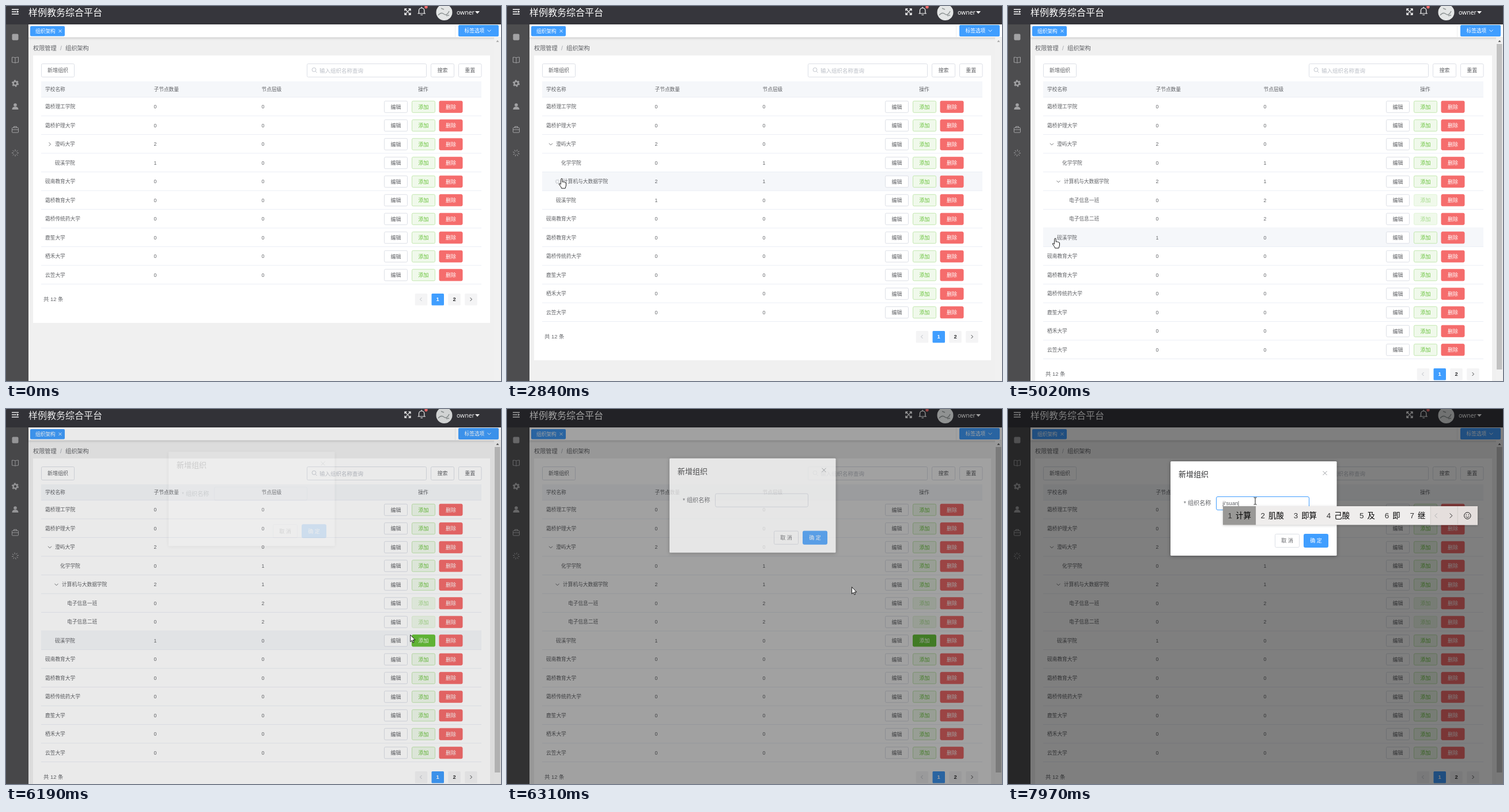
An HTML page that plays this animation: 859x652 px, repeating every 8000 ms.

```html
<!DOCTYPE html>
<html lang="zh-CN">
<head>
<meta charset="utf-8">
<title>组织架构</title>
<style>
  html, body { margin: 0; width: 100%; height: 100%; overflow: hidden; background: #f0f0f0; }
  svg { display: block; width: 100vw; height: 100vh; }
  text { font-family: "Liberation Sans", "Noto Sans CJK SC", "Noto Sans CJK", sans-serif; white-space: pre; }
  .dialog { filter: drop-shadow(0 1px 3px #0005); }
  .bar { filter: drop-shadow(0 1px 2px #0003); }
</style>
</head>
<body>
<svg id="stage" viewBox="0 0 859 652" xmlns="http://www.w3.org/2000/svg"></svg>
<script>
const LOOP = 8000, ROW_TOP = 159, ROW_H = 32.5;
const BLUE = '#409eff', GREEN = '#67c23a', RED = '#f56c6c', INK = '#606266', LINE = '#dcdfe6';
const DIALOG_AT = 6165, FOCUS_AT = 6830;

// Nodes: name, children, time of opening
const tree = [
  ['霜桥理工学院'],
  ['霜桥护理大学'],
  ['澄屿大学', [
    ['化学学院'],
    ['计算机与大数据学院', [['电子信息一班'], ['电子信息二班']], 3000]
  ], 1800],
  ['砚溪学院', [['化学学院']], Infinity],
  ['砚南教育大学'],
  ['霜桥教育大学'],
  ['霜桥传统药大学'],
  ['鹿笙大学'],
  ['栖禾大学'],
  ['云笠大学']
];
const LOAD_TIME = { 1800: 460, 3000: 250 };

// Pointer stops: time, x, y, easing towards the stop
const smooth = p => p * p * (3 - 2 * p), easeIn = p => p * p, easeOut = p => p * (2 - p);
const stops = [
  [70, 800, 645], [860, 110, 275, smooth], [1130, 80, 242, easeOut], [1900, 80, 242, smooth],
  [2500, 95, 300, smooth], [3500, 95, 300, smooth], [4150, 86, 418, smooth], [4500, 84, 425, smooth],
  [4950, 82, 404, smooth], [5150, 82, 404, smooth], [5750, 722, 404, smooth], [6100, 722, 406, smooth],
  [6250, 667, 370, easeIn], [6640, 429, 160, easeOut], [LOOP, 429, 160, smooth]
];
const clicks = [1200, 2620, 6000, 6740];

// Typing steps: time, composed text, candidates
const typing = [
  [7350, 'j', '就 将 进 见 级 家 加'],
  [7540, 'ji', '及 即 继 几 级 机 记'],
  [7630, "ji's", '即使 既是 技术 急速 及时 几十 计算'],
  [7720, "ji'su", '急速 极速 激素 技术 计数 寄宿 疾速'],
  [7810, "ji'sua", '计算 肌酸 即算 己酸 及 即 继'],
  [7890, "ji'suan", '计算 肌酸 即算 己酸 及 即 继']
];

const ramp = (t, from, to) => Math.min(1, Math.max(0, (t - from) / (to - from)));
const rect = (x, y, w, h, fill, stroke = 'none', r = 0) =>
  `<rect x="${x}" y="${y}" width="${w}" height="${h}" rx="${r}" fill="${fill}" stroke="${stroke}"/>`;
const path = (d, stroke, width = 1, fill = 'none', extra = '') =>
  `<path d="${d}" stroke="${stroke}" stroke-width="${width}" fill="${fill}" ${extra}/>`;
const circle = (x, y, r, fill, extra = '') => `<circle cx="${x}" cy="${y}" r="${r}" fill="${fill}" ${extra}/>`;
const text = (x, cy, str, size = 8.7, fill = INK, extra = '') =>
  `<text x="${x}" y="${cy + size * .37}" font-size="${size}" fill="${fill}" ${extra}>${str}</text>`;
const centred = (x, cy, str, size, fill, extra = '') => text(x, cy, str, size, fill, 'text-anchor="middle" ' + extra);
const button = (x, cy, w, h, label, fill = '#fff', stroke = LINE, ink = INK, extra = '') =>
  rect(x + .5, cy - h / 2 + .5, w - 1, h - 1, fill, stroke, 2) + centred(x + w / 2, cy, label, 9, ink, extra);
const chevron = (x, y, angle, size = 3, color = INK) =>
  path(`M${-size / 2} ${-size}L${size / 2} 0L${-size / 2} ${size}`, color, .9, 'none',
    `transform="translate(${x} ${y}) rotate(${angle})"`);

function spokes(x, y, r, t, color) {
  let d = '';
  for (let i = 0; i < 8; i++) {
    const a = i * Math.PI / 4 + t / 2000 * 2 * Math.PI, c = Math.cos(a), s = Math.sin(a);
    d += `M${x + c * r * .5} ${y + s * r * .5}L${x + c * r} ${y + s * r}`;
  }
  return path(d, color, r / 6);
}

function pointerAt(t) {
  const i = stops.findIndex(s => s[0] > t);
  if (i < 1) return null;
  const [t0, x0, y0] = stops[i - 1], [t1, x1, y1, ease] = stops[i];
  const p = ease(ramp(t, t0, t1));
  return { x: x0 + (x1 - x0) * p, y: y0 + (y1 - y0) * p };
}

function visibleRows(t, nodes = tree, level = 0) {
  return nodes.flatMap(([name, kids = [], openAt]) => [
    { name, kids: kids.length, level, openAt },
    ...(t >= openAt ? visibleRows(t, kids, level + 1) : [])
  ]);
}

function chrome() {
  const grey = '#a2a2a4';
  return rect(39, 55, 820, 597, '#f0f0f0') + rect(0, 32, 39, 620, '#4d4d4f') + rect(0, 0, 859, 32, '#36363c')
    + `<g class="bar">${rect(39, 32, 820, 22.5, '#fff')}</g>`
    + path('M10 6h12M10 10h8M10 14h12', '#fff', 1.6) + path('M19 7.7l3.5 2.3-3.5 2.3z', 'none', 0, '#fff')
    + text(39, 11, '样例教务综合平台', 16, '#fff')
    + path('M692 5l10 10M702 5l-10 10M692 8.5v-3.5h3.5M698.5 5h3.5v3.5M702 11.5v3.5h-3.5M695.5 15h-3.5v-3.5', '#fff', 1.3)
    + path('M714.5 13h13.500M716.500 13V8a4.700 4.700 0 019.400 0v5M719.500 15.500h3.500M721.200 3.500v-2', '#fff', 1.2)
    + circle(729, 1.8, 2.7, RED)
    + circle(760.5, 11, 14, '#e4e6e6') + path('M750 16q5-6 10-2t9-5M755 4l5 2M764 17l5-1', '#929898', 1.6)
    + text(782, 11, 'owner', 10.4, '#fff', 'style="font-family:\'Noto Sans\',sans-serif"')
    + path('M814 9h8l-4 4.500z', 'none', 0, '#fff')
    // Side menu
    + rect(10.5, 48.5, 11, 11, grey, 'none', 2)
    + path('M16 90v9M16 90q-2-1-5.500-1v9q3.500 0 5.500 1 2-1 5.500-1v-9q-3.500 0-5.500 1', grey)
    + circle(16, 134.5, 3.4, 'none', `stroke="${grey}" stroke-width="2.4"`)
    + circle(16, 134.5, 5.2, 'none', `stroke="${grey}" stroke-width="1.8" stroke-dasharray="2.8 2.645"`)
    + circle(16, 172, 2.8, grey) + path('M10.500 180q0-5 5.500-5t5.500 5z', 'none', 0, grey)
    + rect(10.5, 211.5, 11, 8.5, 'none', grey, 1) + path('M13.500 211v-1.500h5v1.500M10.500 215h11', grey)
    // Tabs and breadcrumb
    + rect(42, 35, 60, 17.5, BLUE, 'none', 2) + text(51, 43.5, '组织架构', 8.7, '#fff')
    + path('M91.500 41l5 5M96.500 41l-5 5', '#fff', .9)
    + path('M779.500 33v21', '#eee') + rect(785, 33, 70, 20, BLUE, 'none', 2)
    + text(795.5, 43, '标签选项', 8.7, '#fff') + chevron(838.5, 43, 90, 3, '#fff')
    + text(47, 73.5, '权限管理', 10.2) + text(94, 73.5, '/', 10, '#a0a4ac') + text(103, 73.5, '组织架构', 10.2);
}

function tableRow(row, i, t, hovered, pointer) {
  const cy = ROW_TOP + ROW_H * (i + .5), top = cy - ROW_H / 2, { level, kids, openAt } = row;
  let out = hovered ? rect(61, top, 764, ROW_H, '#f5f7fa') : '';
  out += path(`M61 ${top + ROW_H - .5}h764`, '#ebeef5');
  if (kids) {
    const x = 76 + 11.5 * level, loading = t >= openAt - LOAD_TIME[openAt] && t < openAt;
    out += loading ? spokes(x, cy, 4, t, '#909399') : chevron(x, cy, 90 * ramp(t, openAt, openAt + 200));
  }
  out += text(kids ? 85 + 12 * level : level ? 82 + 12 * level : 68, cy, row.name)
    + text(256.5, cy, kids) + text(443.5, cy, level);

  const over = x => hovered && t < DIALOG_AT && pointer.x >= x && pointer.x <= x + 40 && Math.abs(pointer.y - cy) <= 10;
  out += over(656) ? button(656, cy, 41, 21, '编辑', '#ecf5ff', '#c6e2ff', BLUE) : button(656, cy, 41, 21, '编辑');
  out += level > 1 ? button(704, cy, 41, 21, '添加', '#f0f9eb', '#e1f3d8', '#a4da89')
    : button(704, cy, 41, 21, '添加', '#f0f9eb', '#c2e7b0', GREEN);
  const focused = row.openAt === Infinity && t >= 6000;
  if (level < 2 && (over(704) || focused)) {
    const fade = focused ? 1 - ramp(t, FOCUS_AT, FOCUS_AT + 100) : 1;
    out += `<g opacity="${fade}">${button(704, cy, 41, 21, '添加', GREEN, GREEN, '#fff')}</g>`;
  }
  return out + button(751.5, cy, 41, 21, '删除', RED, RED, '#fff', 'font-weight="500"');
}

function content(t, rows, hoverIndex, pointer) {
  const bottom = ROW_TOP + ROW_H * rows.length, cy = bottom + 26, scrolls = rows.length > 12;
  const page = (x, label, active) => rect(x, cy - 10, 21.5, 20.5, active ? BLUE : '#f4f4f5', 'none', 1.5)
    + centred(x + 10.7, cy, label, 9.4, active ? '#fff' : '#303133', 'font-weight="bold"');
  return rect(47, 86, 793, bottom + 67 - 86, '#fff')
    + rect(847, 55, 12, 597, '#f1f1f1') + path('M850.500 62.500h5l-2.500-3z', 'none', 0, scrolls ? '#505050' : '#a3a3a3')
    + (scrolls ? rect(848, 66, 9.5, 566, '#c1c1c1') : '')
    + button(61, 112, 58, 24, '新增组织') + rect(522.5, 100.5, 207, 23, '#fff', LINE, 2)
    + circle(534.5, 110.8, 3.4, 'none', 'stroke="#c0c4cc"') + path('M537 113.500l2.500 2.500', '#c0c4cc')
    + text(544, 112, '输入组织名称查询', 9.5, '#bbbfc7')
    + button(737, 112, 41, 24, '搜索') + button(785, 112, 40.5, 24, '重置')
    + rect(61, 131, 764, 28, '#f5f7fa') + path('M61 158.500h764', '#ebeef5')
    + text(68, 144.5, '学校名称') + text(256.5, 144.5, '子节点数量') + text(443.5, 144.5, '节点层级')
    + centred(724, 144.5, '操作', 8.7, INK)
    + rows.map((row, i) => tableRow(row, i, t, i === hoverIndex, pointer)).join('')
    + text(65, cy, '共 12 条', 9.4)
    + page(709.7, '') + chevron(720, cy, 180, 3, '#b4b8bf') + page(738.5, '1', true)
    + page(767.3, '2') + page(796.2, '') + chevron(807, cy, 0, 3, '#303133');
}

function dialog(t, typed) {
  if (t < DIALOG_AT) return '';
  const p = easeOut(ramp(t, DIALOG_AT, DIALOG_AT + 300));
  const focused = t >= FOCUS_AT + 70;
  const caret = t >= FOCUS_AT ? '<tspan dx="-.6">|</tspan>' : '';
  return `<rect width="859" height="652" opacity="${p / 2}"/>
    <g class="dialog" opacity="${p}" transform="translate(0 ${-20 * (1 - p)})">`
    + rect(282, 91, 288.5, 164, '#fff', 'none', 1.5)
    + text(296, 113.5, '新增组织', 13, '#303133') + path('M546.500 108l7 7M553.500 108l-7 7', '#909399', .9)
    + text(305, 164.5, '*', 10) + text(312, 163.5, '组织名称', 10.1)
    + rect(361.5, 152.5, 161, 23, '#fff', focused ? BLUE : t >= 6500 ? '#c0c4cc' : LINE, 2.5)
    + text(372.3, 163.5, (typed ? typed[1] : '') + caret, 9.7)
    + button(463, 229, 43, 24, '取 消') + button(513, 229, 43, 24, '确 定', BLUE, BLUE, '#fff', 'font-weight="500"')
    + '</g>';
}

function candidateBar(typed) {
  if (!typed) return '';
  const left = 373, top = 169, cy = 185.5;
  let x = left, items = '';
  typed[2].split(' ').forEach((word, i) => {
    const width = 30.5 + 13.3 * word.length;
    if (!i) items += rect(x, top, width, 32.5, '#999896');
    items += text(x + 8.5, cy, i + 1, 13.4, '#333') + text(x + 22, cy, word, 13.4, '#000');
    x += width;
  });
  return `<g class="bar">${rect(left, top, x + 82 - left, 32.5, '#efedec')}</g>` + rect(x, top, 82, 32.5, '#e5dfdd') + items
    + path(`M${x + .5} ${top}v32.500M${x + 47.5} ${top}v32.500`, '#d2cdcb')
    + chevron(x + 10, cy, 180, 4, '#aaa') + chevron(x + 36, cy, 0, 4, '#111')
    + circle(x + 64.5, cy, 5.7, 'none', 'stroke="#111"')
    + circle(x + 62.5, cy - 1.5, .8, '#111') + circle(x + 66.5, cy - 1.5, .8, '#111')
    + path(`M${x + 61.5} ${cy + 1.2}q3 3.600 6 0`, '#111');
}

const shapes = {
  arrow: 'M0 0v12l2.700-2.500 1.800 4 1.800-.8-1.800-3.900h3.800z',
  hand: 'M-1.200 1.200a1.200 1.200 0 012.400 0v5l1-.6 1.300.6 1.200-.2 1 .8 1.200.2.6 1v4l-1.400 5h-6.500l-1-2.600-3.200-4.400q-.4-1.400 1-1.400l1.800 1.600z',
  beam: 'M-2.500-6h2l.5.5.5-.5h2M0-5.500v11M-2.500 6h2l.5-.5.5.5h2'
};

function cursor(t, pointer, row) {
  if (!pointer) return '';
  const { x, y } = pointer, open = t >= DIALOG_AT;
  const inField = open && x > 361 && x < 523 && y > 152 && y < 176;
  const onButton = [656, 704, 751.5].some(b => x >= b && x <= b + 40);
  const kind = inField ? 'beam' : !open && row && (onButton || x < 100 && row.kids) ? 'hand' : 'arrow';
  const pressed = clicks.some(c => t >= c && t < c + 120);
  return (pressed ? circle(x - 2, y - 1, 8.5, '#fff000', 'opacity=".6"') : '')
    + path(shapes[kind], '#000', .9, kind === 'beam' ? 'none' : '#fff', `transform="translate(${x} ${y})"`);
}

const stage = document.getElementById('stage');
const layers = Array.from({ length: 6 }, () =>
  stage.appendChild(document.createElementNS('http://www.w3.org/2000/svg', 'g')));
const painted = [];
const paint = (i, markup) => { if (painted[i] !== markup) layers[i].innerHTML = painted[i] = markup; };

function frame(now) {
  const t = now % LOOP, rows = visibleRows(t), pointer = pointerAt(t);
  const hoverPoint = pointerAt(Math.min(t, 6100));
  const hoverIndex = hoverPoint && t < 6300 ? Math.floor((hoverPoint.y - ROW_TOP) / ROW_H) : -1;
  const typed = typing.filter(step => t >= step[0]).pop();
  paint(0, chrome());
  paint(1, content(t, rows, hoverIndex, hoverPoint));
  paint(2, spokes(16, 255.5, 6, t, '#a2a2a4'));
  paint(3, dialog(t, typed));
  paint(4, candidateBar(typed));
  paint(5, cursor(t, pointer, rows[hoverIndex]));
  requestAnimationFrame(frame);
}
requestAnimationFrame(frame);
</script>
</body>
</html>
```
